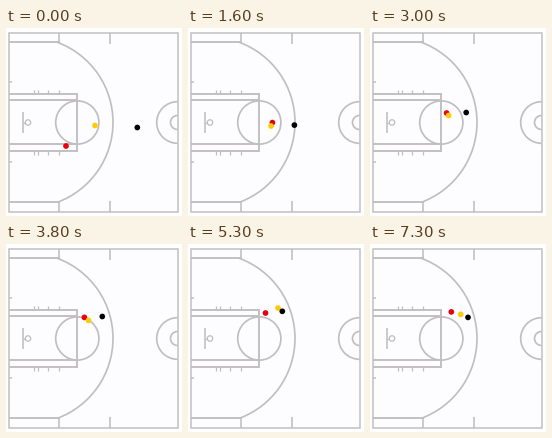
Recreate the animation shown at these times as a matplotlib script. Size 176 by 188 pixels, loop 7400 ms.

```python
import numpy as np
import matplotlib.pyplot as plt
from matplotlib.animation import FuncAnimation
from matplotlib.patches import Arc, Circle, Rectangle

W, H, DPI = 176, 188, 100
FRAMES, STEP = 74, 100
PX = 72 / DPI
GREY = "#c0bec0"

# A few turning points: time in ms, and where each player is then
TIMES = np.array([0, 800, 1600, 3000, 3800, 5300, 6100, 7300])
PATHS = {
    "#e8000c": [60 + 118j, 81.5 + 100j, 84.4 + 94.6j, 76.6 + 85j,
                78.4 + 73.4j, 77.5 + 69j, 79.8 + 65j, 81.3 + 67.9j],
    "#fccc08": [89 + 97.5j, 86 + 97j, 83 + 98j, 78.6 + 87.5j,
                82.5 + 76.4j, 90 + 64j, 91.5 + 60.2j, 90.7 + 70.4j],
    "#000000": [131.3 + 99.5j, 117 + 100.3j, 106.4 + 97.1j, 96.2 + 84.5j,
                96.3 + 72.5j, 94.3 + 67.3j, 95.8 + 63.5j, 98 + 73.4j],
}


def glide(points, t):
    """Smooth Hermite path through the turning points."""
    p = np.array(points)
    slope = np.gradient(p, TIMES)
    i = min(np.searchsorted(TIMES, t, side="right") - 1, len(TIMES) - 2)
    h = TIMES[i + 1] - TIMES[i]
    s = (t - TIMES[i]) / h
    z = ((1 + 2 * s) * (1 - s) ** 2 * p[i]
         + s * (1 - s) ** 2 * h * slope[i]
         + s * s * (3 - 2 * s) * p[i + 1]
         + s * s * (s - 1) * h * slope[i + 1])
    return z.real, z.imag


fig = plt.figure(figsize=(W / DPI, H / DPI), dpi=DPI, facecolor="white")
ax = fig.add_axes([0, 0, 1, 1])
ax.set_xlim(0, W)
ax.set_ylim(H, 0)
ax.axis("off")


def line(x0, y0, x1, y1, width=1.9):
    ax.plot([x0, x1], [y0, y1], color=GREY, lw=width * PX,
            solid_capstyle="butt")


def arc(x, y, r, a0=0, a1=360, width=1.7):
    ax.add_patch(Arc((x, y), 2 * r, 2 * r, theta1=a0, theta2=a1,
                     color=GREY, lw=width * PX))


LEFT, RIGHT, TOP, BOTTOM, MID = 3, 171.5, 4.5, 183.5, 94.5

ax.add_patch(Rectangle((LEFT, TOP), RIGHT - LEFT, BOTTOM - TOP,
                       fc="#fdfcfe", ec=GREY, lw=1.5 * PX))

# Three-point line
R3, HOOP = 85.3, 21.7
bend = np.degrees(np.arcsin(80 / R3))
arc(HOOP, MID - 0.2, R3, -bend, bend)
for y in (14.3, 174.3):
    line(LEFT, y, 53.5, y)

# Lane and free-throw circle
for y in (65.7, 72.3, 116.3, 123):
    line(LEFT, y, 71.3, y)
line(71.3, 65, 71.3, 123.7)
arc(71.3, MID, 21.6)

# Lane, baseline and sideline marks
for x in (28.2, 32, 42.3, 53.3):
    line(x, 61.7, x, 65.5, 1.2)
    line(x, 123.3, x, 127.2, 1.2)
for y in (54, 134):
    line(LEFT, y, 6.2, y, 1.5)
for x, depth in ((53, 10), (103.5, 11)):
    line(x, TOP, x, TOP + depth, 1.6)
    line(x, BOTTOM - depth, x, BOTTOM, 1.6)

# Backboard and hoop
line(17.3, 84, 17.3, 104.7, 1.6)
line(17.3, MID, 19.2, MID, 1.2)
arc(22, MID, 2.7, width=1.3)

# Centre circle
for r in (20.8, 7):
    arc(RIGHT, MID, r, 90, 270)

dots = [ax.add_patch(Circle((0, 0), 2.85, fc=color, lw=0, zorder=5 + z))
        for z, color in enumerate(PATHS)]


def draw(n):
    for dot, path in zip(dots, PATHS.values()):
        dot.center = glide(path, n * STEP)
    return dots


anim = FuncAnimation(fig, draw, frames=FRAMES, interval=STEP,
                     repeat=True, repeat_delay=0, blit=False)
plt.show()
```
